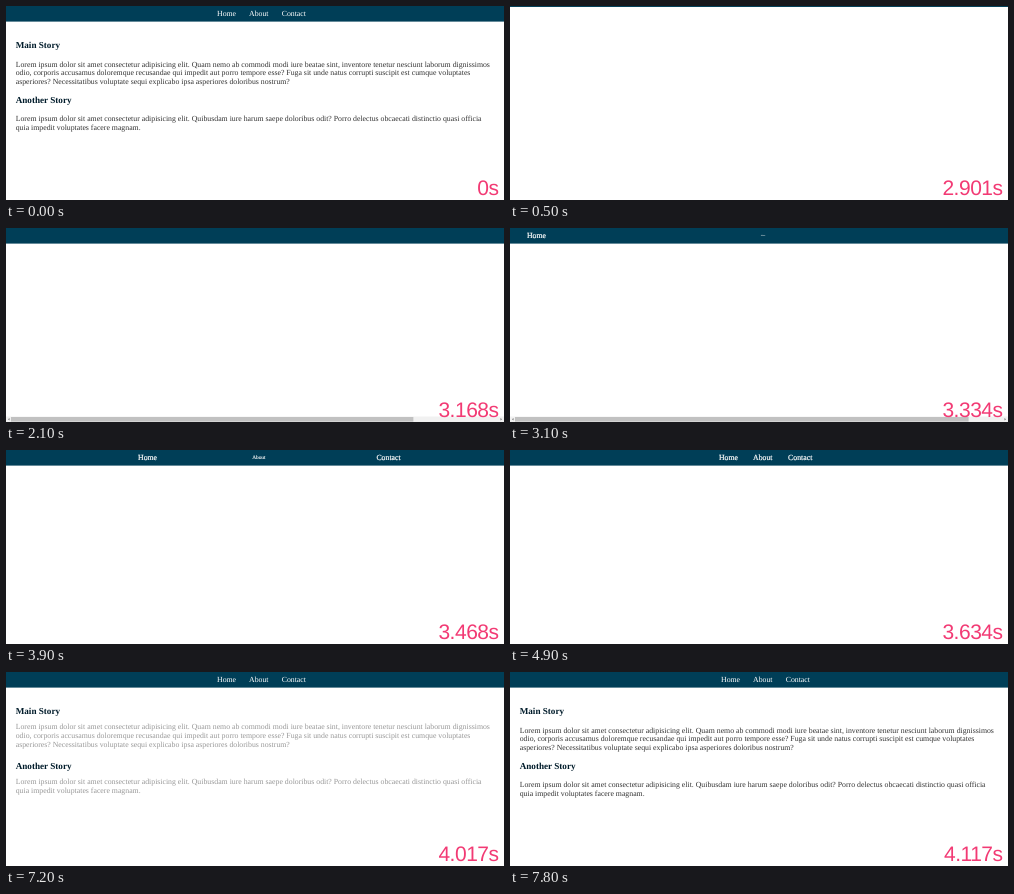
An HTML page for the animation above (7900 ms loop, 498 by 194 pixels).

```html
<!DOCTYPE html>
<html lang="en">
<head>
<meta charset="utf-8">
<title>Page intro</title>
<style>
  html, body { margin: 0; width: 100%; height: 100%; overflow: hidden; background: #fff; }
  svg { display: block; width: 498px; height: 194px; }
  text { font: 7.8px "Liberation Serif", "Times New Roman", serif; text-rendering: geometricPrecision; }
  #nav { fill: #003e57; }
  #links { fill: #fff; stroke: #fff; }
  #heads text { font-size: 9.15px; font-weight: bold; fill: #011c2b; }
  #paras text { fill: #333; }
  #timer { font: 21px "Liberation Sans", Arial, sans-serif; letter-spacing: -0.5px; fill: #f23a74; text-anchor: end; }
</style>
</head>
<body>
<svg viewBox="0 0 498 194">
  <rect id="nav" width="498"/>
  <g id="links">
    <text id="home" x="211" y="10.2">Home</text>
    <text id="about" x="243" y="10.2">About</text>
    <text id="contact" x="275.7" y="10.2">Contact</text>
  </g>
  <g id="heads">
    <text x="9.7" y="42">Main Story</text>
    <text x="9.7" y="97">Another Story</text>
  </g>
  <g id="paras">
    <text x="9.7" y="60.5">Lorem ipsum dolor sit amet consectetur adipisicing elit. Quam nemo ab commodi modi iure beatae sint, inventore tenetur nesciunt laborum dignissimos</text>
    <text x="9.7" y="69.3">odio, corporis accusamus doloremque recusandae qui impedit aut porro tempore esse? Fuga sit unde natus corrupti suscipit est cumque voluptates</text>
    <text x="9.7" y="78">asperiores? Necessitatibus voluptate sequi explicabo ipsa asperiores doloribus nostrum?</text>
    <text x="9.7" y="115.3">Lorem ipsum dolor sit amet consectetur adipisicing elit. Quibusdam iure harum saepe doloribus odit? Porro delectus obcaecati distinctio quasi officia</text>
    <text x="9.7" y="124">quia impedit voluptates facere magnam.</text>
  </g>
  <g id="bar">
    <rect y="188.5" width="498" height="5.5" fill="#f1f1f1"/>
    <rect id="thumb" x="5" y="189" height="4.6" fill="#c1c1c1"/>
    <path d="M3.5 190v2.6l-1.5-1.3zM494.5 190v2.6l1.5-1.3z" fill="#777"/>
  </g>
  <text id="timer" x="492.5" y="189"></text>
</svg>
<script>
const LOOP = 7900, STEP = 100;
const $ = id => document.getElementById(id);
const [nav, links, home, about, contact, heads, paras, bar, thumb, timer] =
  ["nav", "links", "home", "about", "contact", "heads", "paras", "bar", "thumb", "timer"].map($);

const progress = (t, from, to) => Math.min(1, Math.max(0, (t - from) / (to - from)));
const easeInOut = p => p < 0.5 ? 2 * p * p : 1 - 2 * (1 - p) ** 2;
const set = (el, name, value) => el.setAttribute(name, value);

function dropIn(el, p) {
  set(el, "opacity", p);
  set(el, "transform", `translate(0 ${-6.4 * (1 - p)})`);
}

function draw(time) {
  const idle = time < STEP;          // finished page before the intro starts
  const t = idle ? LOOP : time;

  set(nav, "height", 15.6 * progress(t, 400, 2000));

  const slide = easeInOut(progress(t, 2090, 5090)), left = 1 - slide;
  const offset = 301 * left;
  set(links, "visibility", t < 2100 ? "hidden" : "visible");
  set(links, "stroke-width", left > 0 ? 0.2 : 0);
  set(home, "transform", `translate(${-251 * left} 0)`);
  set(contact, "transform", `translate(${offset} 0)`);
  set(about, "transform", `translate(253 8) scale(${slide}) translate(-253 -8)`);

  // The off-stage link widens the page, which brings up the scrollbar
  const pageWidth = 303 + offset;
  set(bar, "visibility", t >= 2100 && pageWidth > 498 ? "visible" : "hidden");
  set(thumb, "width", 488 * Math.min(1, 498 / pageWidth));

  dropIn(heads, easeInOut(progress(t, 5090, 6870)));
  dropIn(paras, easeInOut(progress(t, 6650, 7750)));

  const seconds = 3.0178 + (time - 1200) / STEP * 0.01666;
  timer.textContent = idle ? "0s" : seconds.toFixed(3) + "s";
}

const start = performance.now();
function tick() {
  const t = (performance.now() - start) % LOOP;
  draw(Math.floor(t / STEP) * STEP);
  requestAnimationFrame(tick);
}
draw(0);
requestAnimationFrame(tick);
</script>
</body>
</html>
```
